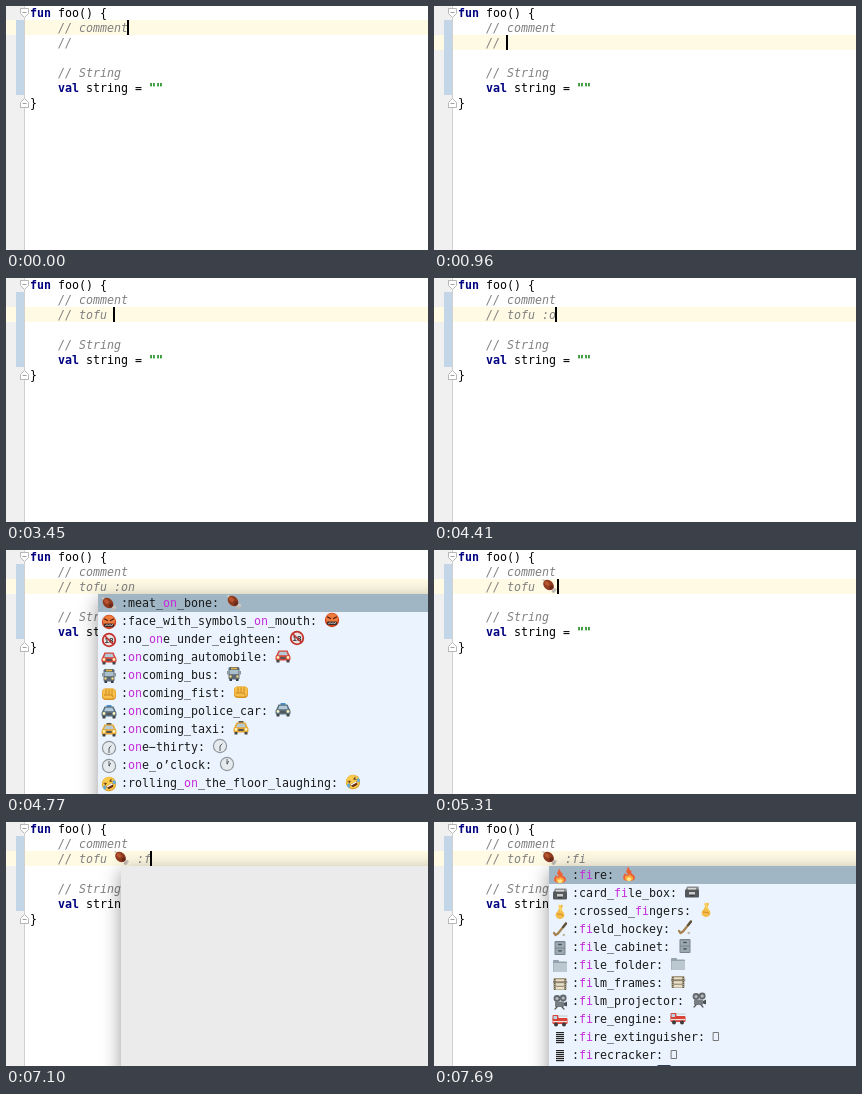
These frames come from a looping animation (422x244 px, 8 s). An HTML page with a canvas:

```html
<!DOCTYPE html>
<html lang="en">
<head>
<meta charset="utf-8">
<title>Emoji completion</title>
<style>
html, body { margin: 0; width: 100%; height: 100%; overflow: hidden; background: #fff; }
canvas { display: block; }
</style>
</head>
<body>
<canvas id="stage" width="422" height="244"></canvas>
<script>
const ctx = document.getElementById('stage').getContext('2d');
const W = 422, H = 244, LOOP = 8000;
const CELL = 7, LINE = 15, INDENT = 52, EMOJI = 16, ROW = 18;
const MONO = '11.63px "DejaVu Sans Mono", monospace';
const MEAT = '🍖';

// Shape helpers; icons are drawn around (0, 0) in a 16 px square.
function box(color, x, y, w, h, r = 0) {
  ctx.fillStyle = color;
  ctx.beginPath();
  ctx.roundRect(x, y, w, h, r);
  ctx.fill();
}
function disc(color, x, y, rx, ry = rx, turn = 0) {
  ctx.fillStyle = color;
  ctx.beginPath();
  ctx.ellipse(x, y, rx, ry, turn, 0, Math.PI * 2);
  ctx.fill();
}
function trace(points) {
  ctx.beginPath();
  for (let i = 0; i < points.length; i += 2) ctx.lineTo(points[i], points[i + 1]);
}
function poly(color, ...points) {
  trace(points);
  ctx.fillStyle = color;
  ctx.fill();
}
function line(color, width, ...points) {
  trace(points);
  ctx.strokeStyle = color;
  ctx.lineWidth = width;
  ctx.lineCap = ctx.lineJoin = 'round';
  ctx.stroke();
}
function icon(draw, x, y, side) {
  ctx.save();
  ctx.translate(x, y);
  draw(side);
  ctx.restore();
}
function write(text, x, y, color, style = '') {
  ctx.font = `${style} ${MONO}`;
  ctx.fillStyle = color;
  ctx.fillText(text, x, y);
}

function meat() {
  line('#d2c8bd', 2, -6, -6, 5, 4);
  disc('#cfc8c0', 5.5, 3.5, 1.7);
  disc('#bfb8b0', 4, 5.3, 1.7);
  disc('#8f3b20', -1, -1, 5.8, 4.6, .7);
  disc('#b9562f', -2.5, -2.5, 2.8, 2, .7);
  disc('#6d2a18', 2, 1.5, 1.8, 2.4, .7);
}
function face(color = '#f6c344') {
  disc('#d89a2b', 0, 0, 7.2);
  disc(color, 0, -.4, 6.7);
  disc('#5b3a1a', -2.5, -1.5, 1, 1.4);
  disc('#5b3a1a', 2.5, -1.5, 1, 1.4);
  disc('#6b3d1c', 0, 3, 2.4, 1.6);
}
function swearing() {
  disc('#c9431f', 0, 0, 7.2);
  disc('#ee7a3c', 0, -1.2, 6.2, 5.5);
  line('#4a1c10', 1.2, -4.5, -3, -1.5, -1.5);
  line('#4a1c10', 1.2, 4.5, -3, 1.5, -1.5);
  box('#3a2a2a', -5, 1.5, 10, 3.5, 1);
  line('#eee', .8, -3.5, 4, -2, 2.5, -.5, 4, 1, 2.5, 2.5, 4, 3.5, 2.5);
}
function underEighteen() {
  disc('#c4322c', 0, 0, 7.2);
  disc('#e9e4e4', 0, 0, 5.4);
  ctx.font = 'bold 8px "Liberation Sans", sans-serif';
  ctx.fillStyle = '#333';
  ctx.fillText('18', -4.5, 3);
  line('#c4322c', 1.5, -4.5, -4.5, 4.5, 4.5);
}
const car = (color, lamp) => () => {
  if (lamp) box(lamp, -2.5, -7, 5, 2, .5);
  poly(color, -4.5, -5.5, 4.5, -5.5, 7, 0, -7, 0);
  poly('#b5cad6', -3.5, -4.2, 3.5, -4.2, 5, -.5, -5, -.5);
  box(color, -7.5, -.5, 15, 5, 1.5);
  box('#444', -6.5, 4, 3, 2.5, .5);
  box('#444', 3.5, 4, 3, 2.5, .5);
  box('#555', -2.7, 1, 5.4, 2);
  disc('#fff1b8', -5, 1.5, 1.4);
  disc('#fff1b8', 5, 1.5, 1.4);
};
function bus() {
  box('#5d6973', -5.5, -7, 11, 12.5, 1.5);
  box('#e3b23c', -3, -6.3, 6, 1.6);
  box('#a9c0cc', -4.5, -4, 9, 4.2);
  box('#89939a', -7, -3, 1.5, 3.5);
  box('#89939a', 5.5, -3, 1.5, 3.5);
  box('#343b41', -4.5, 5, 2.5, 2);
  box('#343b41', 2, 5, 2.5, 2);
  disc('#f2d27a', -3.5, 2.5, 1.2);
  disc('#f2d27a', 3.5, 2.5, 1.2);
}
function fist() {
  box('#d8901f', -7, -5.5, 14, 11.5, 4);
  box('#f7c04a', -6.5, -5.5, 13, 10, 3.5);
  for (let x = -3; x <= 3; x += 3) line('#c98520', .9, x, -4.5, x, 0);
  line('#c98520', 1, -5, 1, 3, 1, 4, 3);
}
const clock = (hour, minute = 0) => () => {
  const hand = (turn, r) => line('#555c62', 1, 0, 0, Math.sin(turn) * r, -Math.cos(turn) * r);
  disc('#8f979d', 0, 0, 7.2);
  disc('#e6eaed', 0, 0, 6);
  hand((hour + minute / 60) * Math.PI / 6, 3);
  hand(minute * Math.PI / 30, 4.6);
};
function rolling() {
  ctx.rotate(-.5);
  disc('#dc9c28', 0, 0, 7.2);
  disc('#f8cb4c', 0, -.4, 6.6);
  line('#6b431c', 1.1, -4, -3, -2, -2, -4, -1);
  line('#6b431c', 1.1, 4, -3, 2, -2, 4, -1);
  poly('#6b3015', -4, 1, 4, 1, 2.5, 4.5, -2.5, 4.5);
  box('#fff', -3.2, 1, 6.4, 1.2);
  disc('#5cabdf', -5.5, 1, 1.4, 2);
  disc('#5cabdf', 5.5, 1, 1.4, 2);
}
function flame(color, s) {
  ctx.fillStyle = color;
  ctx.beginPath();
  ctx.moveTo(-s, -7 * s + 6);
  ctx.bezierCurveTo(3 * s, 6 - 9 * s, s, 6 - 6 * s, 5 * s, 6 - 5 * s);
  ctx.bezierCurveTo(8 * s, 6, 3 * s, 7, 0, 7);
  ctx.bezierCurveTo(-5 * s, 7, -8 * s, 5, -4 * s, 6 - 7 * s);
  ctx.bezierCurveTo(-3 * s, 6 - 4 * s, 0, 6 - 6 * s, -s, -7 * s + 6);
  ctx.fill();
}
function fire() {
  poly('#ee6238', -1, -7.5, 1, -4, 3, -2, 0, 1, -3, -2);
  flame('#ee5f35', 1);
  flame('#f9a83c', .7);
  flame('#ffe48a', .4);
}
function cardBox() {
  poly('#8b8d8e', -5, -5.5, 6.5, -5.5, 7, -2, -6.5, -2);
  box('#55585a', -7, -2.5, 14, 8, 1);
  box('#d8d8d4', -4, -4, 8, 1.5);
  box('#c9cbcb', -3, 0, 6, 2.5);
  box('#303234', -2, 3.2, 4, 1);
}
function fingers() {
  line('#f0b53e', 2.6, -1.5, 1, 1.5, -6);
  line('#fbd064', 2.6, 2, 1, -.5, -6);
  disc('#f5bd47', 0, 3, 4.4, 4);
  line('#cb8a25', .9, -3, 2, 2, 2.5, 3, 4);
}
function hockey() {
  line('#a5814f', 2.2, 6, -6.5, -2, 3.5, -4.5, 5, -6, 3);
  line('#5e503f', 2.2, 6, -6.5, 3, -2.8);
  disc('#f1f1ee', 3.5, 4.5, 2);
  disc('#b9b9b4', 3.8, 5, 1.3);
}
function cabinet() {
  box('#78848c', -5.5, -7, 11, 14, 1);
  for (const y of [-5.8, .6]) {
    box('#9da9b0', -4.5, y, 9, 5.4);
    box('#495259', -1.8, y + 1.6, 3.6, 1.4);
  }
}
function folder() {
  box('#94a3ad', -7, -6, 6, 4, 1);
  box('#94a3ad', -7, -4.5, 14, 10.5, 1);
  box('#bcc8d0', -6.5, -3, 13.5, 9, 1);
}
function film() {
  box('#a49a84', -6.5, -6, 13, 12, 1);
  for (let y = -4.6; y < 5; y += 3.8) box('#e9dfc6', -4, y, 8, 2.4);
  for (let y = -5; y < 6; y += 2) {
    box('#625b4e', -6, y, 1.2, 1);
    box('#625b4e', 4.8, y, 1.2, 1);
  }
  line('#776c59', 1, -7, -2, 7, -2);
}
function projector() {
  for (const [x, y] of [[-3, -3.5], [3.2, -4]]) {
    disc('#63686c', x, y, 3.4);
    disc('#b7bdc1', x, y, 1.6);
  }
  box('#777e83', -5, -.5, 9, 5.5, 1);
  poly('#4b5053', 4, 1, 7, -.5, 7, 4.5, 4, 3.5);
  line('#555', 1.2, -3, 5, -5, 7);
  line('#555', 1.2, 2, 5, 4, 7);
}
function engine() {
  box('#d84238', -7.5, -2, 15, 6, 1);
  box('#d84238', -7.5, -5, 6, 5, 1);
  box('#b9d5e4', -6.5, -4, 3.5, 3);
  line('#c8c8c8', 1.2, -1, -4, 7, -4);
  box('#eee4df', -7, 1, 14, 1.2);
  disc('#3b3b3b', -4, 4.5, 2);
  disc('#3b3b3b', 4, 4.5, 2);
}
function fireworks() {
  box('#31405c', -7, -7, 14, 14, 1.5);
  for (let i = 0; i < 8; i++) {
    const a = i * Math.PI / 4;
    line(i % 2 ? '#f2b84b' : '#e2607a', 1, Math.cos(a) * 2, Math.sin(a) * 2, Math.cos(a) * 5, Math.sin(a) * 5);
  }
}
function missing(side) {
  if (side === 'left') {
    for (let y = -6; y < 6; y += 2) box('#222', -4, y, 8, 1.2);
  } else {
    ctx.strokeStyle = '#777';
    ctx.lineWidth = 1;
    ctx.strokeRect(-6.5, -3.5, 5, 8);
  }
}
function corn() {
  disc('#f0c23c', 1, -1, 3, 6, .6);
  disc('#6d9f45', -2, 2, 2.4, 5, .5);
}
function milk() {
  poly('#c3d0d8', -4.5, -6, 4.5, -6, 3.5, 6.5, -3.5, 6.5);
  poly('#fff', -3.6, -3, 3.6, -3, 2.8, 5.5, -2.8, 5.5);
}
function flag() {
  line('#777', 1.2, -5, -6, -5, 7);
  box('#3d4247', -4.5, -6, 11, 7);
}
const bear = () => face('#a9764a');

const LISTS = {
  o: [
    ['meat_on_bone', meat], ['ear_of_corn', corn], ['eight_o’clock', clock(8)],
    ['eleven_o’clock', clock(11)], ['face_with_open_mouth', face],
    ['face_with_symbols_on_mouth', swearing], ['five_o’clock', clock(5)],
    ['four_o’clock', clock(4)], ['glass_of_milk', milk],
    ['man_office_worker', bear], ['nine_o’clock', clock(9)],
  ],
  on: [
    ['meat_on_bone', meat], ['face_with_symbols_on_mouth', swearing],
    ['no_one_under_eighteen', underEighteen], ['oncoming_automobile', car('#d5453a')],
    ['oncoming_bus', bus], ['oncoming_fist', fist],
    ['oncoming_police_car', car('#56707f', '#4b8fd0')],
    ['oncoming_taxi', car('#e5a631', '#555')], ['one−thirty', clock(1, 30)],
    ['one_o’clock', clock(1)], ['rolling_on_the_floor_laughing', rolling],
  ],
  f: [
    ['fire', fire], ['angry_face', swearing], ['anguished_face', face],
    ['astonished_face', face], ['bear_face', bear], ['black_flag', flag],
    ['card_file_box', cardBox], ['cat_face', face], ['chequered_flag', flag],
    ['confounded_face', face], ['confused_face', face],
  ],
  fi: [
    ['fire', fire], ['card_file_box', cardBox], ['crossed_fingers', fingers],
    ['field_hockey', hockey], ['file_cabinet', cabinet], ['file_folder', folder],
    ['film_frames', film], ['film_projector', projector], ['fire_engine', engine],
    ['fire_extinguisher', missing], ['firecracker', missing], ['fireworks', fireworks],
  ],
};

// [start ms, typed text, caret visible, popup: a list key or 'blank']
const STEPS = [
  [0, '', true], [630, '', false], [960, '', true], [1650, '', false],
  [2160, 't', true], [2250, 'to', true], [2670, 'tof', true], [2850, 'tofu', true],
  [3450, 'tofu ', true], [4080, 'tofu :', true], [4410, 'tofu :o', true],
  [4590, 'tofu :o', true, 'o'], [4740, 'tofu :on', true, 'o'], [4770, 'tofu :on', false, 'on'],
  [5310, `tofu ${MEAT}`, true], [5880, `tofu ${MEAT}`, false], [5910, `tofu ${MEAT} `, true],
  [6630, `tofu ${MEAT} :`, true], [7010, `tofu ${MEAT} :f`, true],
  [7100, `tofu ${MEAT} :f`, true, 'blank'], [7160, `tofu ${MEAT} :f`, true, 'f'],
  [7220, `tofu ${MEAT} :fi`, true, 'fi'], [7690, `tofu ${MEAT} :fi`, false, 'fi'],
];

const lineTop = row => row * LINE - 1;
const baseline = row => row * LINE + 11;
const textWidth = text => [...text].reduce((sum, c) => sum + (c === MEAT ? EMOJI : CELL), 0);

function comment(text, row) {
  let x = INDENT;
  text.split(MEAT).forEach((part, i) => {
    if (i) {
      icon(meat, x + 7.5, lineTop(row) + 7);
      x += EMOJI;
    }
    write(part, x, baseline(row), '#808080', 'italic');
    x += part.length * CELL;
  });
}

function foldMark(y, dir) {
  const shape = [14.5, y - 4 * dir, 22.5, y - 4 * dir, 22.5, y + dir, 18.5, y + 5 * dir, 14.5, y + dir, 14.5, y - 4 * dir];
  poly('#fff', ...shape);
  line('#b8b8b8', 1, ...shape);
  box('#a0a0a0', 16.5, y - .5, 4, 1);
}

function editor(caretRow) {
  box('#fff', 0, 0, W, H);
  box('#f0f0f0', 0, 0, 18, H);
  box('#fffae3', 0, lineTop(caretRow), W, LINE);
  box('#c3d6e8', 10, lineTop(1), 8, LINE * 5);
  box('#d0d0d0', 18, 0, 1, H);
  foldMark(6.5, 1);
  foldMark(97.5, -1);
  write('fun', 24, baseline(0), '#000080', 'bold');
  write('foo() {', 52, baseline(0), '#000');
  comment('// comment', 1);
  comment('// String', 4);
  write('val', INDENT, baseline(5), '#000080', 'bold');
  write('string =', 80, baseline(5), '#000');
  write('""', 143, baseline(5), '#008000', 'bold');
  write('}', 24, baseline(6), '#000');
}

function popup(key, left) {
  const top = lineTop(3);
  ctx.save();
  ctx.shadowColor = 'rgba(0,0,0,.4)';
  ctx.shadowBlur = 18;
  ctx.shadowOffsetY = 5;
  box(key === 'blank' ? '#ebebeb' : '#ebf4fe', left, top, 500, 300);
  ctx.restore();
  if (key === 'blank') return;

  box('#a0b6c4', left, top, 500, ROW);
  LISTS[key].forEach(([name, draw], i) => {
    const y = top + i * ROW, x = left + 23, label = `:${name}:`;
    const hit = label.search(new RegExp(`[:_]${key}`)) + 1;
    const part = (from, to, color) => write(label.slice(from, to), x + from * CELL, y + 13, color);
    part(0, hit, '#1a1a1a');
    part(hit, hit + key.length, '#c62bdc');
    part(hit + key.length, label.length, '#1a1a1a');
    icon(draw, left + 11, y + 10, 'left');
    icon(draw, x + (label.length + 1) * CELL + 8, y + 8, 'right');
  });
}

function render(time) {
  const [, typed, caretOn, list] = STEPS.findLast(step => step[0] <= time);
  const row = time < 960 ? 1 : 2;
  const text = `// ${typed}`;
  editor(row);
  comment(text, 2);
  if (caretOn) {
    const end = textWidth(row === 1 ? '// comment' : text);
    box('#000', INDENT + end - 1, lineTop(row), 2, LINE);
  }
  if (list) popup(list, INDENT + textWidth(text.slice(0, text.lastIndexOf(':'))) - 16);
}

const began = performance.now();
function tick() {
  render((performance.now() - began) % LOOP);
  requestAnimationFrame(tick);
}
tick();
</script>
</body>
</html>
```
